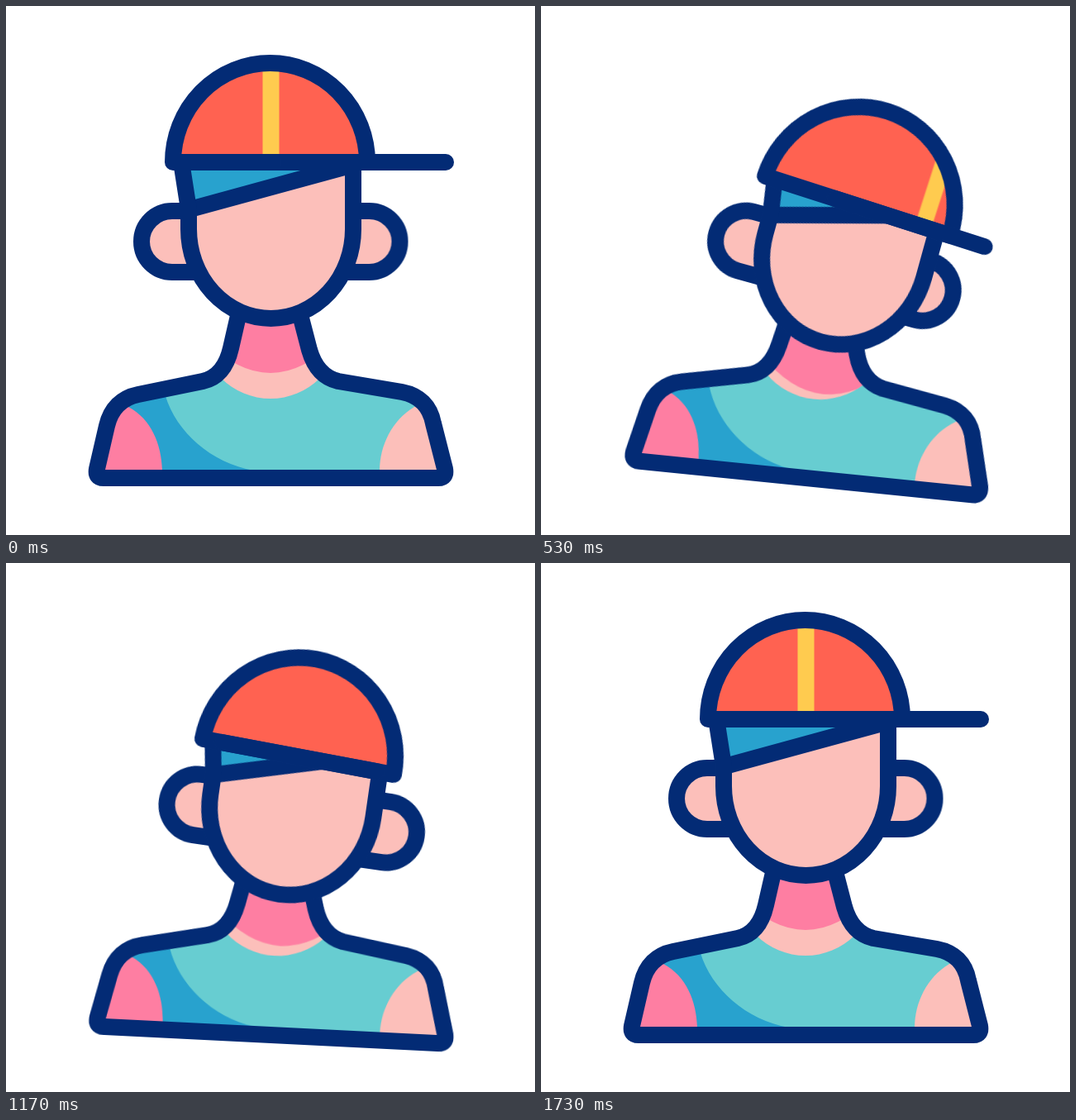
An HTML page without scripts that plays this animation: 640x640 px, repeating every 2 s.

```html
<!DOCTYPE html>
<html lang="en">
<head>
<meta charset="utf-8">
<title>Boy in a cap</title>
<style>
  html, body { margin: 0; width: 100%; height: 100%; overflow: hidden; background: #fff; }
  svg { display: block; width: 100vw; height: 100vh; }

  .line { fill: none; stroke: #032b75; stroke-width: 20; stroke-linejoin: round; }
  .skin { fill: #fcbfba; }
  .pink { fill: #fe7ea2; }
  .teal { fill: #67cdd1; }
  .blue { fill: #28a2ce; }
  .red { fill: #ff6251; }
  .gold { fill: #ffcb4f; }

  .move { animation: 2s cubic-bezier(.33, 0, .67, 1) infinite; }
  .body { animation-name: sway; transform-origin: 320px 571px; }
  .head { animation-name: tilt; transform-origin: 320px 370px; }
  .shade { animation-name: shade; }
  .ear-l { animation-name: ear-l; }
  .ear-r { animation-name: ear-r; }
  .cap { animation-name: cap; }
  .strip { animation-name: strip; }
  .brim { animation-name: brim; stroke-linecap: round; }

  @keyframes sway {
    0%, 86.67%, 100% { transform: rotate(0deg); }
    21.67%, 66.67% { transform: rotate(6.9deg); }
    46.67% { transform: rotate(-4.3deg); }
  }
  @keyframes tilt {
    0%, 86.67%, 100% { transform: translate(0, 0) rotate(0deg); }
    21.67%, 65.83% { transform: translate(3px, 30.5px) rotate(12.6deg); }
    45% { transform: translate(0, 2px) rotate(-13deg); }
  }
  @keyframes shade {
    0%, 86.67%, 100% { transform: translate(0, 0); }
    21.67%, 66.67% { transform: translate(13px, 27px); }
    45% { transform: translate(-6px, 1px); }
  }
  /* The far ear slides behind the face as the head turns. */
  @keyframes ear-l {
    0%, 60%, 100% { transform: translateX(0); }
    31.67% { transform: translateX(0); animation-timing-function: ease-out; }
    43.33% { transform: translateX(27px); }
    50% { transform: translateX(27px); animation-timing-function: ease-in; }
  }
  @keyframes ear-r {
    0%, 86.67%, 100% { transform: translateX(0); }
    20% { transform: translateX(-33px); }
    33.33%, 57% { transform: translateX(0); }
    68.33% { transform: translateX(-30px); }
  }
  @keyframes cap {
    0%, 86.67%, 100% { transform: translateY(0) rotate(0deg); }
    16.67%, 23.33% { transform: translateY(21px) rotate(3.1deg); }
    36.67% { transform: translateY(5px) rotate(-1.8deg); }
    46.67% { transform: translateY(2px) rotate(3deg); }
    58.33% { transform: translateY(21px) rotate(2.4deg); }
    68.33% { transform: translateY(21px) rotate(.2deg); }
  }
  @keyframes strip {
    0% { transform: translateX(0); animation-timing-function: ease-in; }
    16.67% { transform: translateX(72px); animation-timing-function: ease-out; }
    23.33% { transform: translateX(100px); animation-timing-function: ease-in; }
    36.67% { transform: translateX(-103px); animation-timing-function: linear; }
    40%, 59% { transform: translateX(-140px); }
    68.33% { transform: translateX(103px); }
    83.33%, 100% { transform: translateX(0); }
  }
  @keyframes brim {
    0%, 81.67%, 100% { transform: translateX(117px); }
    16.67% { transform: translateX(44px); }
    21.67% { transform: translateX(38px); }
    28.33% { transform: translateX(72px); }
    36.67% { transform: translateX(-10px); }
    46.67% { transform: translateX(-111px); }
    56.67% { transform: translateX(-10px); animation-timing-function: linear; }
    60% { transform: translateX(10px); }
    64.5% { transform: translateX(55px); }
    68.33% { transform: translateX(38px); }
  }
</style>
</head>
<body>
<svg viewBox="0 0 640 640">
  <defs>
    <path id="torso" d="M283 366L272 414C267 436 256 450 238 454L160 470C140 474 127 487 122 508L110 560Q108 571 118 571H523Q533 571 531 560L517 505C513 484 500 471 479 467L402 454C385 450 373 437 367 416L354 366"/>
    <path id="ear" d="M260 248H201A37 37 0 0 0 201 322H260"/>
    <path id="face" d="M211 182L221 246V270A99.5 108 0 0 0 420 270V182"/>
    <path id="dome" d="M-118 0A117.5 120 0 0 1 117 0Z"/>
    <circle id="collar" cx="320" cy="390.5" r="84.5"/>
    <clipPath id="in-torso"><use href="#torso"/></clipPath>
    <clipPath id="in-collar"><use href="#collar"/></clipPath>
    <clipPath id="in-dome"><use href="#dome"/></clipPath>
  </defs>

  <g class="move body">
    <g clip-path="url(#in-torso)">
      <path class="teal" d="M90 340H550V580H90Z"/>
      <path class="blue" d="M90 440H187L193 472C206 515 248 553 300 562V580H90Z"/>
      <path class="pink" d="M90 470H125L148 485C176 500 188 530 189 562V580H90Z"/>
      <path class="skin" d="M550 470H520L494 485C467 501 452 532 452 562V580H550Z"/>
      <use href="#collar" class="skin"/>
      <g clip-path="url(#in-collar)">
        <path class="pink move shade" d="M240 403Q320 485 400 403V300H240Z"/>
      </g>
    </g>
    <use href="#torso" class="line"/>

    <g class="move head">
      <g class="move ear-l">
        <use href="#ear" class="skin"/>
        <use href="#ear" class="line"/>
      </g>
      <g class="move ear-r">
        <g transform="matrix(-1 0 0 1 640.5 0)">
          <use href="#ear" class="skin"/>
          <use href="#ear" class="line"/>
        </g>
      </g>
      <use href="#face" class="skin"/>
      <path class="blue" d="M211 182L221 246L420 192V182Z"/>
      <path class="line" d="M221 246.4L420 192"/>
      <use href="#face" class="line"/>

      <g transform="translate(320 189)">
        <g class="move cap">
          <use href="#dome" class="red"/>
          <g clip-path="url(#in-dome)">
            <path class="gold move strip" d="M-9.5 0V-130H10.5V0Z"/>
          </g>
          <use href="#dome" class="line"/>
          <path class="line move brim" d="M-95 0H95"/>
        </g>
      </g>
    </g>
  </g>
</svg>
</body>
</html>
```
